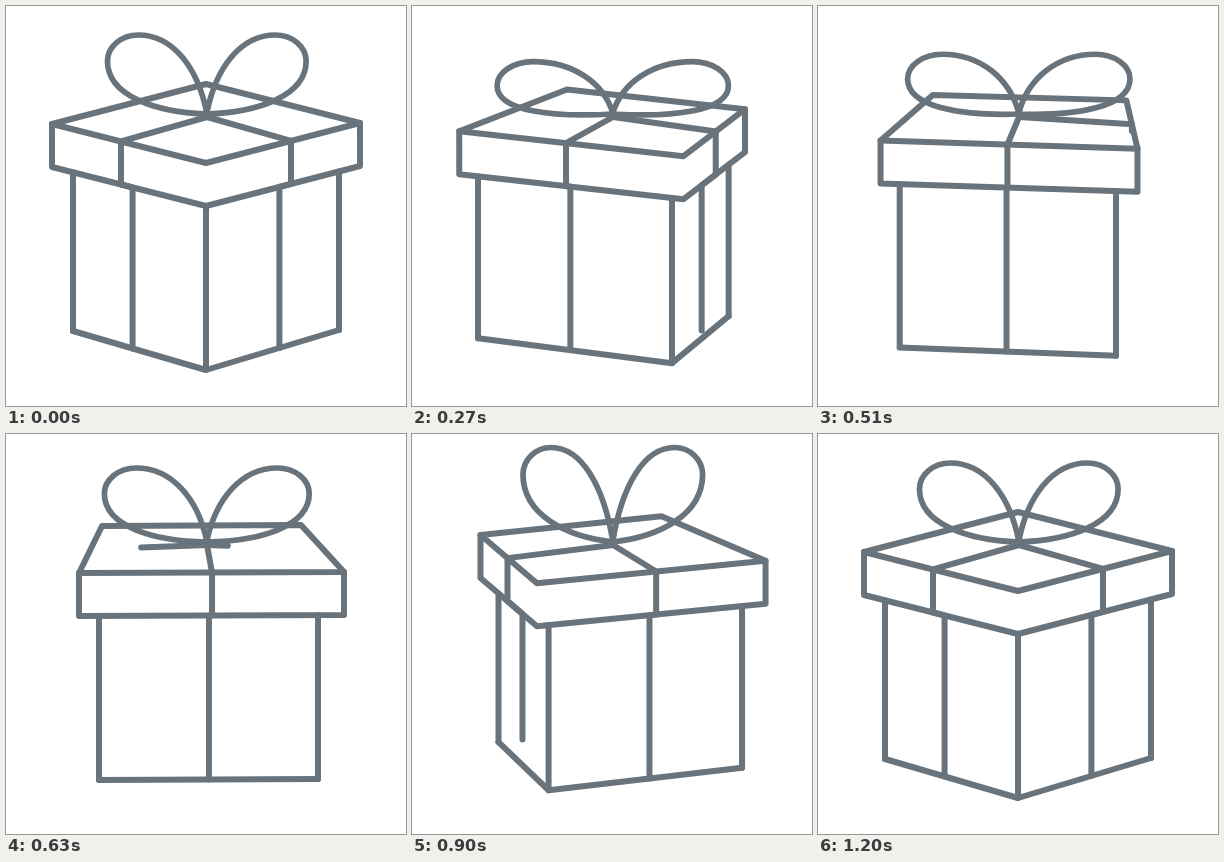
Animation of 400x400 px, one loop 1.23 s. Source, as an HTML page with a canvas:

```html
<!DOCTYPE html>
<html lang="en">
<head>
<meta charset="utf-8">
<title>Turning gift box</title>
<style>
  html, body { margin: 0; width: 100%; height: 100%; overflow: hidden; background: #fff; }
  canvas { display: block; width: 400px; height: 400px; }
</style>
</head>
<body>
<canvas id="stage" width="400" height="400"></canvas>
<script>
const ctx = document.getElementById('stage').getContext('2d');
const LOOP = 1230, STEP = 30, TURN = 1200;
const LID_HEIGHT = 43, BOX_HEIGHT = 207;
const CENTER = { x: 201, y: 111 };

// Path of one corner through a full turn: lid x, lid y, body x.
const ORBIT = [
  [200, 157, 200], [243, 153, 236], [297, 147, 281], [338, 138, 312], [348, 132, 323], [357, 122, 335],
  [354, 117, 333], [345, 109, 329], [320, 98, 303], [295, 91, 282], [268, 85, 259], [231, 80, 227],
  [200, 78, 200], [175, 81, 179], [135, 86, 144], [96, 92, 111], [80, 96, 97], [58, 107, 77],
  [46, 118, 67], [42, 121, 62], [55, 130, 73], [73, 139, 93], [99, 146, 115], [153, 152, 160]
];
const QUARTER = [0, 150, 390, 630, 780, 1020];
const ORBIT_TIMES = ORBIT.map((_, i) => Math.floor(i / 6) * TURN + QUARTER[i % 6]);
const BOW_TIMES = [0, 150, 390, 630, 780, 900, 1020];
const BOW_TOPS = [[29], [47], [58], [34], [18], [13.5], [17]];

const clamp01 = v => Math.max(0, Math.min(1, v));
const mix = (a, b, k) => a + (b - a) * k;
const mixPoint = (a, b, k) => ({ x: mix(a.x, b.x, k), y: mix(a.y, b.y, k) });
const lower = (p, dy) => ({ x: p.x, y: p.y + dy });

// Periodic cubic spline with uneven knots.
function spline(times, rows, period, t) {
  const n = times.length;
  t %= period;
  let i = n - 1;
  while (times[i] > t) i--;
  const time = j => times[(j + n) % n] + Math.floor(j / n) * period;
  const row = j => rows[(j + n) % n];
  const span = time(i + 1) - time(i);
  const u = (t - time(i)) / span;
  return row(i).map((a, c) => {
    const b = row(i + 1)[c];
    const m0 = (b - row(i - 1)[c]) / (time(i + 1) - time(i - 1)) * span;
    const m1 = (row(i + 2)[c] - a) / (time(i + 2) - time(i)) * span;
    return a + u * (m0 + u * (3 * (b - a) - 2 * m0 - m1 + u * (2 * (a - b) + m0 + m1)));
  });
}

function corner(quarter, t) {
  const [x, y, bodyX] = spline(ORBIT_TIMES, ORBIT, 4 * TURN, quarter * TURN + t);
  return { x, y, base: { x: bodyX, y: y + BOX_HEIGHT } };
}

function line(points, closed = false) {
  ctx.beginPath();
  points.forEach(p => ctx.lineTo(p.x, p.y));
  if (closed) ctx.closePath();
  ctx.stroke();
}

// Draws only the first part of a line.
function trimmedLine(points, part) {
  if (part <= 0) return;
  let length = 0;
  for (let i = 1; i < points.length; i++) {
    length += Math.hypot(points[i].x - points[i - 1].x, points[i].y - points[i - 1].y);
  }
  if (part < 1) ctx.setLineDash([length * part, length * 2]);
  line(points);
  ctx.setLineDash([]);
}

function rimY(rim, x) {
  for (let i = 1; i < rim.length; i++) {
    const a = rim[i - 1], b = rim[i];
    if (x <= b.x || i === rim.length - 1) {
      return mix(a.y, b.y, clamp01((x - a.x) / (b.x - a.x)));
    }
  }
}

function ribbon(a, b, angle, rim, part) {
  const slope = Math.tan(angle);
  const k = 0.5 + 0.052 * (Math.abs(slope) <= 1 ? slope : 1 / slope);
  const edge = mixPoint(a, b, k);
  const foot = mixPoint(a.base, b.base, k);
  const bodyTop = { x: foot.x, y: rimY(rim, foot.x) };
  trimmedLine([CENTER, edge, lower(edge, LID_HEIGHT), bodyTop, foot], part);
}

function bowLoop(side, top) {
  const w = 81.5 + 0.615 * top;
  const sideY = 28 + 0.93 * top;
  const crest = 0.69 * w;
  const x = d => 200.8 + side * d;
  ctx.beginPath();
  ctx.moveTo(x(0), 108);
  ctx.bezierCurveTo(x(0.52 * w), 100 + 0.207 * top, x(w), sideY + 45 - 0.35 * top, x(w), sideY);
  ctx.bezierCurveTo(x(w), mix(sideY, top, 0.55), x(mix(crest, w, 0.55)), top, x(crest), top);
  ctx.bezierCurveTo(x(0.34 * w), top, x(9), mix(top, 107, 0.42), x(0), 107);
  ctx.stroke();
}

function draw(t) {
  ctx.fillStyle = '#fff';
  ctx.fillRect(0, 0, 400, 400);
  ctx.strokeStyle = '#69737c';
  ctx.lineWidth = 6;
  ctx.lineCap = ctx.lineJoin = 'round';

  const [front, right, back, left] = [0, 1, 2, 3].map(q => corner(q, t));
  const visible = [left, front];
  if (back.x < left.x) visible.unshift(back);
  if (right.x > front.x) visible.push(right);
  const rim = visible.map(p => lower(p, LID_HEIGHT));

  line([front, right, back, left], true);
  line([visible[0], ...rim, visible[visible.length - 1]]);
  line(visible.map(p => p.base));
  visible.forEach(({ base }) => line([{ x: base.x, y: rimY(rim, base.x) }, base]));

  const angle = (t / TURN - 0.5) * Math.PI / 2;
  ribbon(left, front, angle, rim, 1);
  ribbon(front, right, angle + Math.PI / 2, rim, clamp01((655 - t) / 395));
  ribbon(back, left, angle - Math.PI / 2, rim, clamp01((t - 555) / 375));

  const [top] = spline(BOW_TIMES, BOW_TOPS, TURN, t);
  ctx.lineWidth = 5.7;
  bowLoop(-1, top);
  bowLoop(1, top);
}

const start = performance.now();
function tick() {
  const t = (performance.now() - start) % LOOP;
  draw(Math.floor(t / STEP) * STEP % TURN);
  requestAnimationFrame(tick);
}
tick();
</script>
</body>
</html>
```
